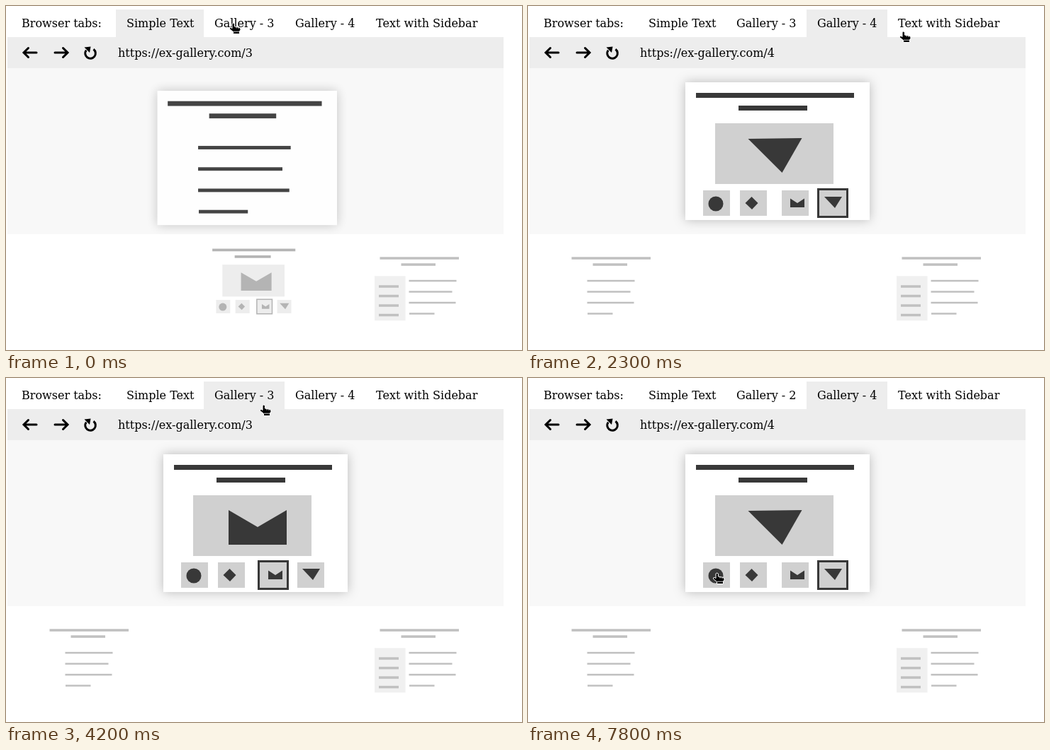
Recreate the animation shown at these times as an HTML page. Size 728 by 487 pixels, loop 8 s.

```html
<!DOCTYPE html>
<html lang="en">
<head>
<meta charset="utf-8">
<title>Browser tabs</title>
<style>
  html, body { margin: 0; width: 100%; height: 100%; overflow: hidden; background: #fff; }
  svg { display: block; width: 100vw; height: 100vh; }
  text { font: 16px "DejaVu Serif", serif; }
  .dark { fill: #383838; }
  .light { fill: #d0d0d0; }
  .card { fill: #fff; }
  .frame { fill: none; stroke: #383838; stroke-width: 3; }
  .icon { fill: none; stroke: #000; stroke-width: 3; stroke-linecap: round; }
  .cursor path { fill: #000; stroke: #fff; stroke-width: 1; stroke-linejoin: round; }
</style>
</head>
<body>
<svg viewBox="0 0 728 487">
  <rect id="tab" y="5" height="39" fill="#ededed"/>
  <rect x="2" y="44" width="700" height="44" fill="#ededed"/>
  <rect x="2" y="88" width="700" height="235" fill="#f8f8f8"/>
  <text x="22" y="30">Browser tabs:</text>
  <text x="170" y="30">Simple Text</text>
  <text x="294" y="30" id="galleryLabel"></text>
  <text x="408" y="30">Gallery - 4</text>
  <text x="522" y="30">Text with Sidebar</text>
  <text x="158" y="72" id="url"></text>
  <path class="icon" d="M43 66H25.5M31.5 59.5L25 66L31.5 72.5"/>
  <path class="icon" d="M69 66H86.5M80.5 59.5L87 66L80.5 72.5"/>
  <path class="icon" d="M123.5 61.2A7.3 7.3 0 1 1 113.2 62.6" style="stroke-linecap:butt"/>
  <path d="M110.5 58.5L119.5 57.5L118 66Z"/>
  <g id="pages"></g>
  <g id="hand" class="cursor">
    <path d="M5 2Q6.7 0 8.4 2V6L15 7.3Q17.4 8 17 10.5L15.5 13V16.5H6.5V13.5L1.5 9.5Q1 7 3.5 7.5L5 8.6Z"/>
    <path d="M7 13.2H15M11 6.6V8.6M14 7.2V9" style="fill:none;stroke-width:.8"/>
  </g>
  <g id="arrow" class="cursor">
    <path d="M1 1V16L4.5 12.8L7 18.6L9.6 17.4L7.2 11.8H12Z"/>
  </g>
</svg>
<script>
const LOOP = 8000, STEP = 100;
const $ = id => document.getElementById(id);
const setAttrs = (el, attrs) => {
  for (const key in attrs) el.setAttribute(key, attrs[key]);
};
const clamp = v => Math.max(0, Math.min(1, v));
const mix = (a, b, k) => a + (b - a) * k;
const smooth = k => k * k * (3 - 2 * k);
const easeOut = k => 1 - (1 - k) ** 2;

// Page contents, in card units of 260 by 195
const box = (kind, x, y, w, h, extra = '') =>
  `<rect class="${kind}" x="${x}" y="${y}" width="${w}" height="${h}" ${extra}/>`;
const shape = (points, extra = '') => `<polygon class="dark" points="${points}" ${extra}/>`;
const heading = box('dark', 15, 15, 223, 7) + box('dark', 75, 33, 97, 7);
const lines = x => [134, 122, 132, 71]
  .map((w, i) => box('dark', x + (i === 3), 80 + 31 * i, w, 5)).join('');

const thumbX = [25, 77, 136, 189];
const thumbs = thumbX.map(x => box('light', x, 153, 38, 36)).join('') +
  '<circle class="dark" cx="43" cy="172" r="10.5"/>' +
  shape('93.5,162 102.5,171 94,180 84.5,171') +
  shape('148,164.5 158,171 168,164.5 168,177 148,177') +
  shape('196,162 221,162 211,178');
const pictures = box('light', 42, 58, 167, 86) +
  shape('119,70 148.5,100 122,128 90.5,98', 'data-picture="2"') +
  shape('92,79 133,103 174,79 174,128 92,128', 'data-picture="3"') +
  shape('88.5,80 164.5,79 136.5,128', 'data-picture="4"');
const sidebar = box('light', 0, 69, 87, 126) +
  [0, 1, 2, 3].map(i => box('dark', 12, 95 + 27 * i, 56, 7)).join('');

const pages = [
  { x: 54, body: lines(59) },
  { x: 286.5, body: pictures + thumbs + box('frame', 0, 151.5, 41, 39, 'id="frame"') },
  { x: 520, body: sidebar + lines(97) }
];
$('pages').innerHTML = pages.map(page =>
  `<g>${box('card', 0, 0, 260, 195)}${heading}${page.body}</g>`).join('');
pages.forEach((page, i) => {
  page.el = $('pages').children[i];
  page.card = page.el.firstElementChild;
});

function placePage({ x, el, card }, k) {
  const size = smooth(k);
  const fade = (size + k) / 2;
  setAttrs(el, {
    transform: `translate(${mix(x, 222, size)} ${mix(347.8, 108, size)}) scale(${mix(.5, 1, size)})`,
    opacity: mix(.31, 1, fade)
  });
  card.style.filter = fade > .2 ? `drop-shadow(0 0 8px rgba(0,0,0,${.25 * fade}))` : 'none';
}

// Returns how far each page (text, gallery, sidebar) is opened
function openness(t) {
  if (t < 900) {
    const k = clamp((Math.min(t, 300) + 53) / 390);
    return [1 - k, k, 0];
  }
  if (t >= 2900 && t < 3700) return [0, .93, .07];
  return t >= 3700 && t < 4200 ? [0, 0, 1] : [0, 1, 0];
}

// Last entry whose start time has passed
const at = (track, t) => track.findLast(entry => entry[0] <= t);

const tabTrack = [[0, 155, 124], [100, 279, 114], [1800, 393, 114], [3700, 507, 172],
  [4200, 279, 114], [7000, 393, 114]];
const pictureTrack = [[0, 3], [1700, 4], [4200, 3], [5700, 2], [7000, 4]];

// time, cursor, x, y, optional glide length and easing
const cursorTrack = [
  [0, 'hand', 314, 23],
  [900, 'hand', 454, 24, 600, smooth],
  [2000, 'hand', 464, 28],
  [2200, 'hand', 571, 41, 600, easeOut],
  [3700, 'hand', 357, 26],
  [4200, 'hand', 357, 37],
  [4600, 'arrow', 341, 193],
  [4900, 'hand', 308, 278],
  [5200, 'hand', 309, 287],
  [5700, 'arrow', 458, 331],
  [5900, 'hand', 310, 282],
  [6200, 'arrow', 365, 138],
  [6400, 'arrow', 431, 45],
  [6700, 'hand', 439, 22],
  [7300, 'arrow', 335, 193],
  [7500, 'arrow', 276, 254],
  [7800, 'hand', 260, 275]
];

function placeCursor(t) {
  const entry = at(cursorTrack, t);
  let [start, kind, x, y, glide, ease] = entry;
  if (glide) {
    const [, , fromX, fromY] = cursorTrack[cursorTrack.indexOf(entry) - 1];
    const k = ease(clamp((t - start + STEP) / glide));
    x = mix(fromX, x, k);
    y = mix(fromY, y, k);
  }
  for (const id of ['hand', 'arrow']) {
    $(id).style.display = id === kind ? '' : 'none';
  }
  $(kind).setAttribute('transform', `translate(${Math.round(x)} ${Math.round(y)})`);
}

function draw(time) {
  const t = Math.floor(time % LOOP / STEP) * STEP;
  const [, tabX, tabWidth] = at(tabTrack, t);
  const picture = at(pictureTrack, t)[1];

  setAttrs($('tab'), { x: tabX, width: tabWidth });
  $('galleryLabel').textContent = `Gallery - ${t < 5700 ? 3 : 2}`;
  $('url').textContent = t >= 2900 && t < 4200
    ? 'https://ex-withsidebar.com' : `https://ex-gallery.com/${picture}`;

  $('frame').setAttribute('x', thumbX[picture - 1] - 1.5);
  for (const el of document.querySelectorAll('[data-picture]')) {
    el.style.display = +el.dataset.picture === picture ? '' : 'none';
  }
  openness(t).forEach((k, i) => placePage(pages[i], k));
  placeCursor(t);
}

const began = performance.now();
function tick() {
  draw(performance.now() - began);
  requestAnimationFrame(tick);
}
tick();
</script>
</body>
</html>
```
